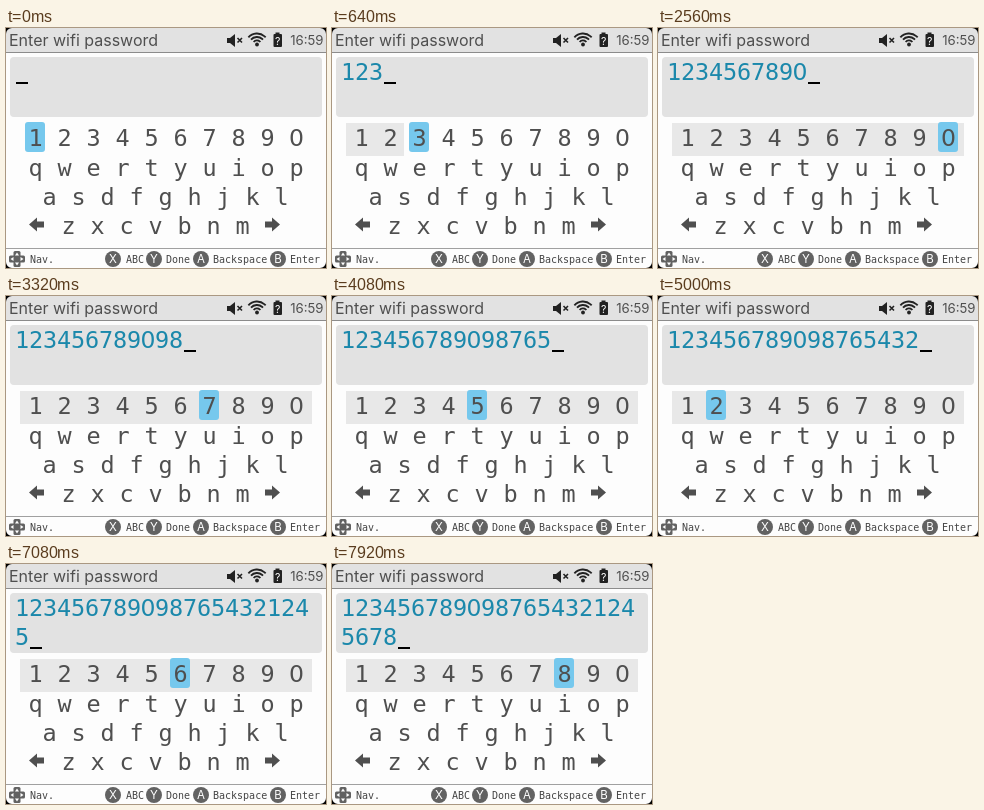
Recreate the animation shown at these times as an HTML page with a canvas. Size 320 by 240 pixels, loop 8000 ms.

```html
<!DOCTYPE html>
<html lang="en">
<head>
<meta charset="utf-8">
<title>On-screen keyboard</title>
<style>
html, body { margin: 0; width: 100%; height: 100%; overflow: hidden; background: #fff; }
canvas { display: block; width: 320px; height: 240px; }
</style>
</head>
<body>
<canvas id="stage" width="320" height="240"></canvas>
<script>
const ctx = document.getElementById('stage').getContext('2d');
const LOOP = 8000;
const INK = '#4f4f4f', BLUE = '#1b88ab', PANEL = '#e2e2e2', GREY = '#626262';
const UI = 'Inter, sans-serif';
const SANS = '"DejaVu Sans", sans-serif';
const MONO = '"DejaVu Sans Mono", monospace';
const DIGITS = '1234567890';
const PITCH = 29;
const CELL = 14;
const PER_LINE = 21;

// [key, time the highlight arrives, time the key is pressed (0: passed over)]
const STEPS = [
  ['1', 0, 120], ['2', 250, 380], ['3', 500, 630], ['4', 750, 880], ['5', 1000, 1130],
  ['6', 1240, 1390], ['7', 1510, 1640], ['8', 1770, 1900], ['9', 2020, 2150], ['0', 2280, 2430],
  ['9', 2650, 2760], ['8', 2940, 3060], ['7', 3240, 3360], ['6', 3540, 3660], ['5', 3850, 3980],
  ['4', 4160, 4280], ['3', 4460, 4580], ['2', 4760, 4880], ['1', 5080, 5220], ['2', 5360, 5500],
  ['3', 5700, 0], ['4', 5850, 5990], ['5', 6500, 6800], ['6', 6960, 7120], ['7', 7270, 7400],
  ['8', 7620, 7750]
];

function box(x, y, w, h, r, color) {
  ctx.fillStyle = color;
  ctx.beginPath();
  ctx.roundRect(x, y, w, h, r);
  ctx.fill();
}

function disc(x, y, r, color) {
  ctx.fillStyle = color;
  ctx.beginPath();
  ctx.arc(x, y, r, 0, Math.PI * 2);
  ctx.fill();
}

function poly(points, color) {
  ctx.fillStyle = color;
  ctx.beginPath();
  points.forEach(([x, y]) => ctx.lineTo(x, y));
  ctx.fill();
}

function stroke(color, width, path) {
  ctx.strokeStyle = color;
  ctx.lineWidth = width;
  ctx.beginPath();
  path();
  ctx.stroke();
}

function text(s, x, y, size, family, color, align = 'left') {
  ctx.font = size + 'px ' + family;
  ctx.fillStyle = color;
  ctx.textAlign = align;
  ctx.fillText(s, x, y);
}

// The zero has no inner mark, so it comes from the proportional face.
function glyph(ch, x, y, color) {
  text(ch, x, y, 23.5, ch === '0' ? SANS : MONO, color, 'center');
}

function statusIcons() {
  const dark = '#222';
  poly([[221, 10], [224, 10], [229, 6], [229, 19], [224, 15], [221, 15]], dark);
  stroke(dark, 1.6, () => {
    ctx.moveTo(231.5, 10); ctx.lineTo(236, 14.5);
    ctx.moveTo(236, 10); ctx.lineTo(231.5, 14.5);
  });
  for (const r of [4.5, 8, 11.5]) {
    stroke(dark, 1.8, () => ctx.arc(251, 17, r, -Math.PI * 0.77, -Math.PI * 0.23));
  }
  disc(251, 16.5, 1.9, dark);
  box(267.5, 6, 8.5, 13, 1, dark);
  box(269.5, 4.5, 4, 2, 0, dark);
  text('?', 271.7, 16.5, 10.5, UI, '#fff', 'center');
}

function header() {
  box(0, 0, 320, 24, 0, PANEL);
  box(0, 24, 320, 1, 0, '#8c8c8c');
  text('Enter wifi password', 3, 17.5, 16, UI, INK);
  text('16:59', 317.5, 17, 13.2, UI, INK, 'right');
  statusIcons();
}

function dpad(x, y) {
  box(x - 3.5, y - 8, 7, 16, 1.5, GREY);
  box(x - 8, y - 3.5, 16, 7, 1.5, GREY);
  for (let i = 0; i < 4; i++) {
    ctx.save();
    ctx.translate(x, y);
    ctx.rotate(i * Math.PI / 2);
    poly([[0, -6.5], [2, -3.5], [-2, -3.5]], '#fff');
    ctx.restore();
  }
}

function footer() {
  box(0, 220, 320, 1, 0, '#a0a0a0');
  dpad(11, 231);
  text('Nav.', 24, 235, 10, MONO, '#444');
  const hints = [['X', 107, 'ABC', 120], ['Y', 148, 'Done', 160],
                 ['A', 195, 'Backspace', 207], ['B', 272, 'Enter', 284]];
  for (const [button, x, label, lx] of hints) {
    disc(x, 231, 8, GREY);
    text(button, x, 235.2, 11.5, UI, '#fff', 'center');
    text(label, lx, 235, 10, MONO, '#444');
  }
}

function arrow(x, y, dir) {
  const pts = [[-8, 0], [0, -7], [0, -3], [7, -3], [7, 3], [0, 3], [0, 7]];
  poly(pts.map(([px, py]) => [x + px * dir, y + py]), INK);
}

function row(keys, x, y) {
  [...keys].forEach((ch, i) => glyph(ch, x + i * PITCH, y, INK));
}

function keyboard(key, reach) {
  // pale band left behind along the digits already visited
  if (reach > 0) {
    const right = reach === 9 ? 306 : 14 + reach * PITCH;
    box(14, 95, right - 14, 33, 0, '#e8e8e8');
  }
  box(19 + DIGITS.indexOf(key) * PITCH, 94, 20, 30, 3, '#76c8ed');
  row(DIGITS, 29.5, 118);
  row('qwertyuiop', 29.5, 148);
  row('asdfghjkl', 43.5, 177);
  row('zxcvbnm', 62.5, 206);
  arrow(31, 196.5, 1);
  arrow(266, 196.5, -1);
}

function field(typed) {
  box(4, 29, 312, 60, 4, PANEL);
  [...typed].forEach((ch, i) => {
    const line = Math.floor(i / PER_LINE);
    glyph(ch, 16 + (i % PER_LINE) * CELL, 52 + line * 29, BLUE);
  });
  // the caret stays at the end of a full line until the next character wraps
  const line = typed.length > PER_LINE ? 1 : 0;
  const col = typed.length - line * PER_LINE;
  box(10 + col * CELL, 54 + line * 29, 12, 2, 0, '#000');
}

function corners() {
  ctx.fillStyle = '#000';
  ctx.beginPath();
  ctx.rect(0, 0, 320, 240);
  ctx.roundRect(0, 0, 320, 240, 6);
  ctx.fill('evenodd');
}

function draw(t) {
  const seen = STEPS.filter(s => s[1] <= t);
  const typed = seen.filter(s => s[2] && s[2] <= t).map(s => s[0]).join('');
  const reach = Math.max(...seen.map(s => DIGITS.indexOf(s[0])));
  box(0, 0, 320, 240, 0, '#fdfdfd');
  header();
  field(typed);
  keyboard(seen[seen.length - 1][0], reach);
  footer();
  corners();
}

const start = performance.now();
function tick() {
  draw((performance.now() - start) % LOOP);
  requestAnimationFrame(tick);
}
tick();
</script>
</body>
</html>
```
